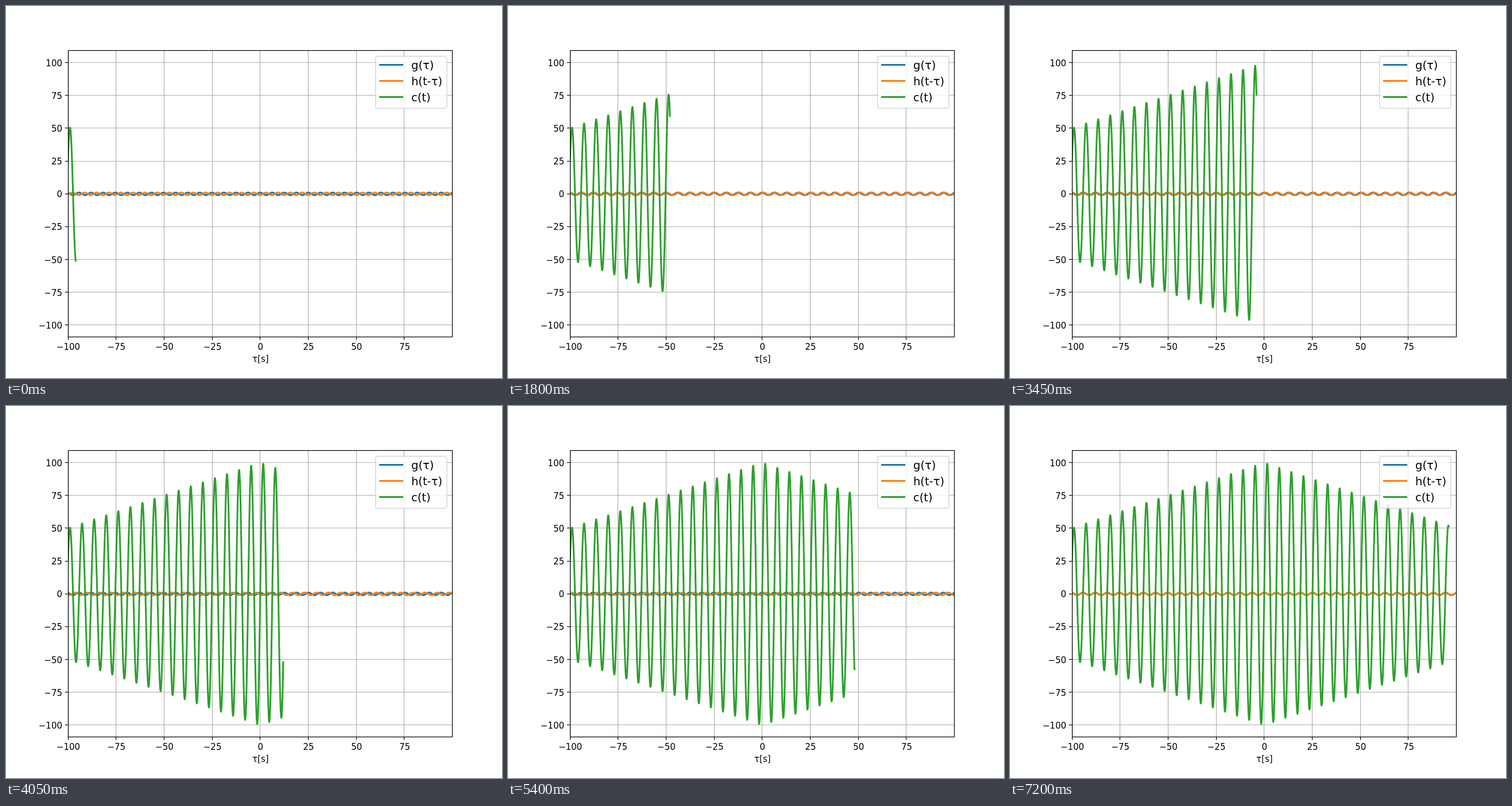
An HTML page for the animation above (7350 ms loop, 864 px wide and 648 px high).

```html
<!DOCTYPE html>
<html>
<head>
<meta charset="utf-8">
<style>
html, body { margin: 0; width: 100%; height: 100%; overflow: hidden; background: #fff; }
svg { display: block; }
text { font: 15px "DejaVu Sans", sans-serif; }
#legend text { font-size: 19.5px; }
.curve { fill: none; stroke-width: 3; stroke-linecap: square; stroke-linejoin: round; }
.grid { stroke: #b0b0b0; stroke-width: 1.2; }
.axis { fill: none; stroke: #000; stroke-width: 1.2; }
</style>
</head>
<body>
<svg width="864" height="648" viewBox="0 0 864 648">
  <clipPath id="area"><rect x="108" y="77.76" width="669.6" height="498.96"/></clipPath>
  <g id="grid"></g>
  <g id="curves" clip-path="url(#area)"></g>
  <g id="axes"><rect class="axis" x="108.5" y="77.5" width="669" height="499"/></g>
  <g id="legend">
    <rect x="643.7" y="87.5" width="124.2" height="90.8" rx="3.9" fill="#fff" stroke="#ccc" stroke-width="1.5" opacity=".8"/>
  </g>
</svg>
<script>
const START = -100, END = 99.98, STEP = 0.02;
const FRAME_MS = 150, FRAMES = 49;
const LEFT = 108, RIGHT = 777.6, TOP = 77.76, BOTTOM = 576.72, Y_MAX = 109.13;

const px = x => LEFT + (x - START) / (END - START) * (RIGHT - LEFT);
const py = y => (TOP + BOTTOM) / 2 - y / Y_MAX * (BOTTOM - TOP) / 2;
const snap = v => Math.floor(v) + 0.5;
const label = v => String(v).replace('-', '\u2212');

function add(parent, tag, attrs, text = '') {
  const el = document.createElementNS('http://www.w3.org/2000/svg', tag);
  for (const key in attrs) el.setAttribute(key, attrs[key]);
  el.textContent = text;
  return document.getElementById(parent).appendChild(el);
}

for (let v = -100; v <= 100; v += 25) {
  const x = snap(px(v)), y = snap(py(v));
  if (v < 100) {
    add('grid', 'path', { class: 'grid', d: `M${x} ${TOP}V${BOTTOM}` });
    add('axes', 'path', { class: 'axis', d: `M${x} 576.5v5.25` });
    add('axes', 'text', { x: px(v) + 0.5, y: 599, 'text-anchor': 'middle' }, label(v));
  }
  add('grid', 'path', { class: 'grid', d: `M${LEFT} ${y}H${RIGHT}` });
  add('axes', 'path', { class: 'axis', d: `M108 ${y}h-5.25` });
  add('axes', 'text', { x: 98, y: Math.round(py(v) + 6), 'text-anchor': 'end' }, label(v));
}
add('axes', 'text', { x: 443.3, y: 620, 'text-anchor': 'middle' }, 'τ[s]');

const [gCurve, hCurve, cCurve] = [
  ['g(τ)', '#1f77b4'], ['h(t-τ)', '#ff7f0e'], ['c(t)', '#2ca02c']
].map(([name, stroke], i) => {
  const y = 102.5 + 28 * i;
  add('legend', 'path', { class: 'curve', stroke, d: `M651.5 ${y}h39` });
  add('legend', 'text', { x: 706, y: y + 7.5 }, name);
  return add('curves', 'path', { class: 'curve', stroke });
});

function plot(curve, f, end) {
  const points = [];
  const count = Math.round((end - START) / STEP);
  for (let i = 0; i < count; i += 4) points.push(START + i * STEP);
  points.push(end);
  curve.setAttribute('d', 'M' + points.map(x => px(x).toFixed(2) + ' ' + py(f(x)).toFixed(2)).join('L'));
}

// Convolution of cos and sin, each limited to [-100, 100]
const conv = t => (100 - Math.abs(t) / 2) * Math.sin(t);

plot(gCurve, Math.cos, END);

let shown = -1;
function draw() {
  const frame = Math.floor(performance.now() / FRAME_MS) % FRAMES;
  if (frame !== shown) {
    shown = frame;
    const t = -96 + 4 * frame;
    plot(hCurve, x => Math.sin(t - x), END);
    plot(cCurve, conv, t - STEP);
  }
  requestAnimationFrame(draw);
}
draw();
</script>
</body>
</html>
```
